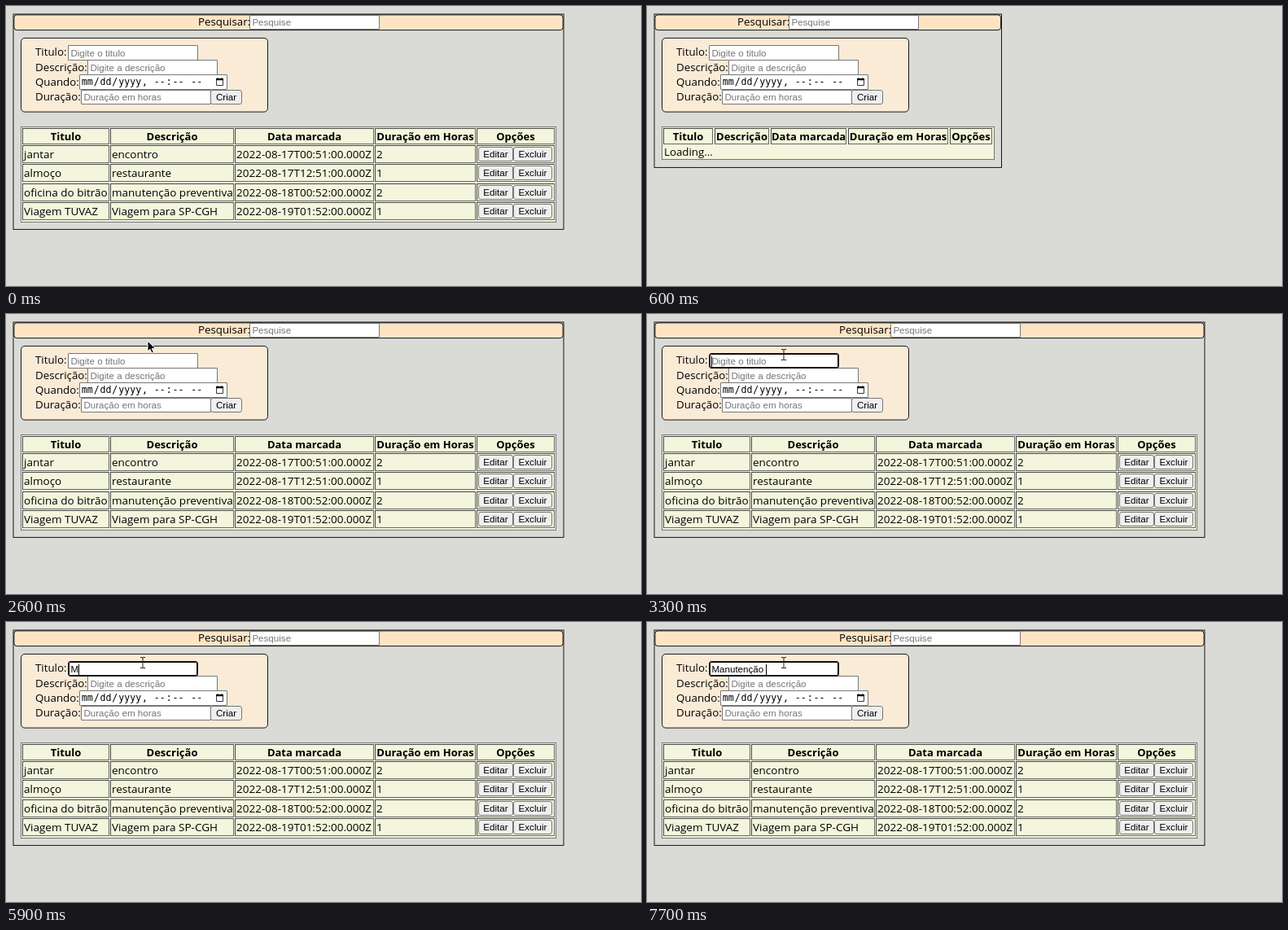
Write an HTML page that moves like this. It is 780 px wide and 344 px high and loops after 8 s.

```html
<!DOCTYPE html>
<html lang="pt-BR">
<head>
<meta charset="utf-8">
<title>Agenda</title>
<style>
  html, body { margin: 0; width: 100%; height: 100%; overflow: hidden; background: #dadbd7; }
  #stage { position: relative; width: 780px; height: 344px; overflow: hidden; color: #000;
    font: 500 13.3px "Open Sans", "Noto Sans", sans-serif; }
  #stage div, #stage svg { position: absolute; box-sizing: border-box; white-space: pre; }
  .text { line-height: 20px; }
  .field { background: #fff; border: 1px solid #767676; border-radius: 1px; padding-left: 2.4px;
    font: 11.6px "Liberation Sans", Arial, sans-serif; color: #757575; }
  .field.date { padding-left: 1px; color: #000; font-family: "DejaVu Sans Mono", monospace; }
  .date span { padding: 0 .87px; }
  .field.focus { border-color: #101010; border-radius: 3px; box-shadow: inset 0 0 0 1px #101010; z-index: 1; }
  .caret { display: inline-block; width: 1px; height: 13px; margin: 0 -.5px; background: #000; vertical-align: -3px; }
  .button { background: #efefef; border: 1px solid #767676; border-radius: 3px; text-align: center;
    font: 11.6px "Liberation Sans", Arial, sans-serif; }
  .table { background: #f3f5dc; border: 1px solid #777; }
  .cell { border: 1px solid; border-color: #484848 #686868 #686868 #484848; padding-left: 1px; font-size: 13.5px; }
  .head { padding: 0; text-align: center; font-size: 13px; font-weight: 700; }
</style>
</head>
<body>
<div id="stage"></div>
<script>
const stage = document.getElementById("stage");

function add(parent, cls, x, y, w, h, html = "") {
  const el = document.createElement("div");
  el.className = cls;
  el.style.cssText = `left:${x}px;top:${y}px;width:${w}px;height:${h}px`;
  if (/field|button|cell/.test(cls)) {
    el.style.lineHeight = h - 2 + "px";
  }
  el.innerHTML = html;
  parent.append(el);
  return el;
}

// Outlined panel; coordinates run through the middle of the thin line
const box = (parent, x, y, w, h, r, fill) => add(parent, "", 0, 0, 780, 344,
  `<svg width="780" height="344"><rect x="${x}" y="${y}" width="${w}" height="${h}" rx="${r}"
    fill="${fill}" stroke="#000" stroke-width=".9"/></svg>`);

const label = (parent, x, mid, text) => add(parent, "text", x, mid - 10, 120, 20, text);

const heads = ["Titulo", "Descrição", "Data marcada", "Duração em Horas", "Opções"];
const events = [
  ["jantar", "encontro", "2022-08-17T00:51:00.000Z", "2"],
  ["almoço", "restaurante", "2022-08-17T12:51:00.000Z", "1"],
  ["oficina do bitrão", "manutenção preventiva", "2022-08-18T00:52:00.000Z", "2"],
  ["Viagem TUVAZ", "Viagem para SP-CGH", "2022-08-19T01:52:00.000Z", "1"]
];

// Frame, search bar and table head shared by both page states
function page(width, height, searchX, tableHeight, cols) {
  const root = add(stage, "", 0, 0, 780, 344);
  box(root, 9, 10, width, height, 0, "none");
  box(root, 9.9, 10.9, width - 1.8, 18.7, 3.5, "#ffe4c4");
  label(root, searchX, 19, "Pesquisar:");
  add(root, "field", searchX + 63, 11, 160, 18, "Pesquise");
  add(root, "table", 18, 148, width - 18, tableHeight);
  cols.forEach(([x, end], i) => add(root, "cell head", x, 150, end - x, 20, heads[i]));
  return root;
}

const cols = [[20, 127], [128, 280], [281, 452], [453, 577], [578, 674]];
const full = page(676, 264.4, 236, 118, cols);
events.forEach((row, r) => {
  const y = Math.round(171 + r * 23.4);
  cols.forEach(([x, end], i) => add(full, "cell", x, y, end - x, 22, row[i] || ""));
  add(full, "button", 580, y + 2, 43, 18, "Editar");
  add(full, "button", 623, y + 2, 48, 18, "Excluir");
});

const loading = page(426.5, 188.4, 111, 41, [[20, 81], [83, 150], [152, 245], [247, 370], [372, 424]]);
label(loading, 21, 179, "Loading...");

box(stage, 18.5, 39.4, 303, 90.7, 4.5, "#faebd7");
["Titulo:", "Descrição:", "Quando:", "Duração:"].forEach((s, i) => label(stage, 36, 56.4 + i * 18.1, s));
const title = add(stage, "field", 76, 48, 160, 19);
add(stage, "field", 100, 66, 160, 19, "Digite a descrição");
add(stage, "field date", 90, 84, 182, 19,
  "<span>mm</span>/<span>dd</span>/<span>yyyy</span>, <span>--</span>:<span>--</span> <span>--</span>");
add(stage, "field", 92, 103, 160, 18, "Duração em horas");
add(stage, "button", 251, 103, 39, 18, "Criar");

stage.insertAdjacentHTML("beforeend", `
  <svg style="left:257px;top:87px" width="11" height="12" viewBox="0 0 11 12">
    <path d="M1.500 2.500h8v8h-8z" fill="none" stroke="#222" stroke-width=".9"/>
    <path d="M1 2h9v2.200H1zM2.500 1h1v2h-1zM7.500 1h1v2h-1z"/>
  </svg>
  <svg id="pointer" style="left:0;top:0;z-index:2;overflow:visible" width="1" height="1">
    <path id="arrow" d="M0 0v13l3-2.800 2 4.800 2.300-1-2-4.600H9.500z" stroke="#fff"/>
    <path id="beam" d="M-3-6.500h2q1 0 1 1v11q0 1-1 1h-2M3-6.500h-2q-1 0-1 1M3 6.500h-2q-1 0-1-1" fill="none" stroke="#222"/>
  </svg>`);
const [pointer, arrow, beam] = ["pointer", "arrow", "beam"].map(id => document.getElementById(id));

const LOOP = 8000;
const typed = [[5900, 1], [6100, 2], [6300, 3], [6400, 4], [6600, 6], [6700, 7],
  [7100, 8], [7400, 9], [7500, 10], [7700, 11]];
const blinks = [[3000, 1], [3800, 0], [4400, 1], [5100, 0], [5700, 1]];
const at = (steps, t) => steps.reduce((value, [time, next]) => t >= time ? next : value, 0);
const show = (el, on) => { el.style.display = on ? "" : "none"; };

let lastTitle = "";
function render(t) {
  const busy = t >= 500 && t < 1400;
  show(full, !busy);
  show(loading, busy);

  const text = "Manutenção ".slice(0, at(typed, t));
  const caret = at(blinks, t) ? '<i class="caret"></i>' : "";
  const html = text ? text + caret : caret + "Digite o titulo";
  if (html !== lastTitle) title.innerHTML = lastTitle = html;
  title.style.color = text ? "#000" : "";
  title.classList.toggle("focus", t >= 3000);

  // The pointer advances in tenths of a second
  const p = Math.min(1, Math.max(0, (Math.floor(t / 100) - 24) / 5));
  const ease = 1 - (1 - p) ** 2;
  const y = 3 + 47 * ease;
  show(pointer, t >= 2400);
  pointer.style.transform = `translate(${Math.round(186 - 18 * ease)}px, ${Math.round(y)}px)`;
  show(arrow, y < 48);
  show(beam, y >= 48);
}

const start = performance.now();
function tick() {
  render((performance.now() - start) % LOOP);
  requestAnimationFrame(tick);
}
render(0);
requestAnimationFrame(tick);
</script>
</body>
</html>
```
